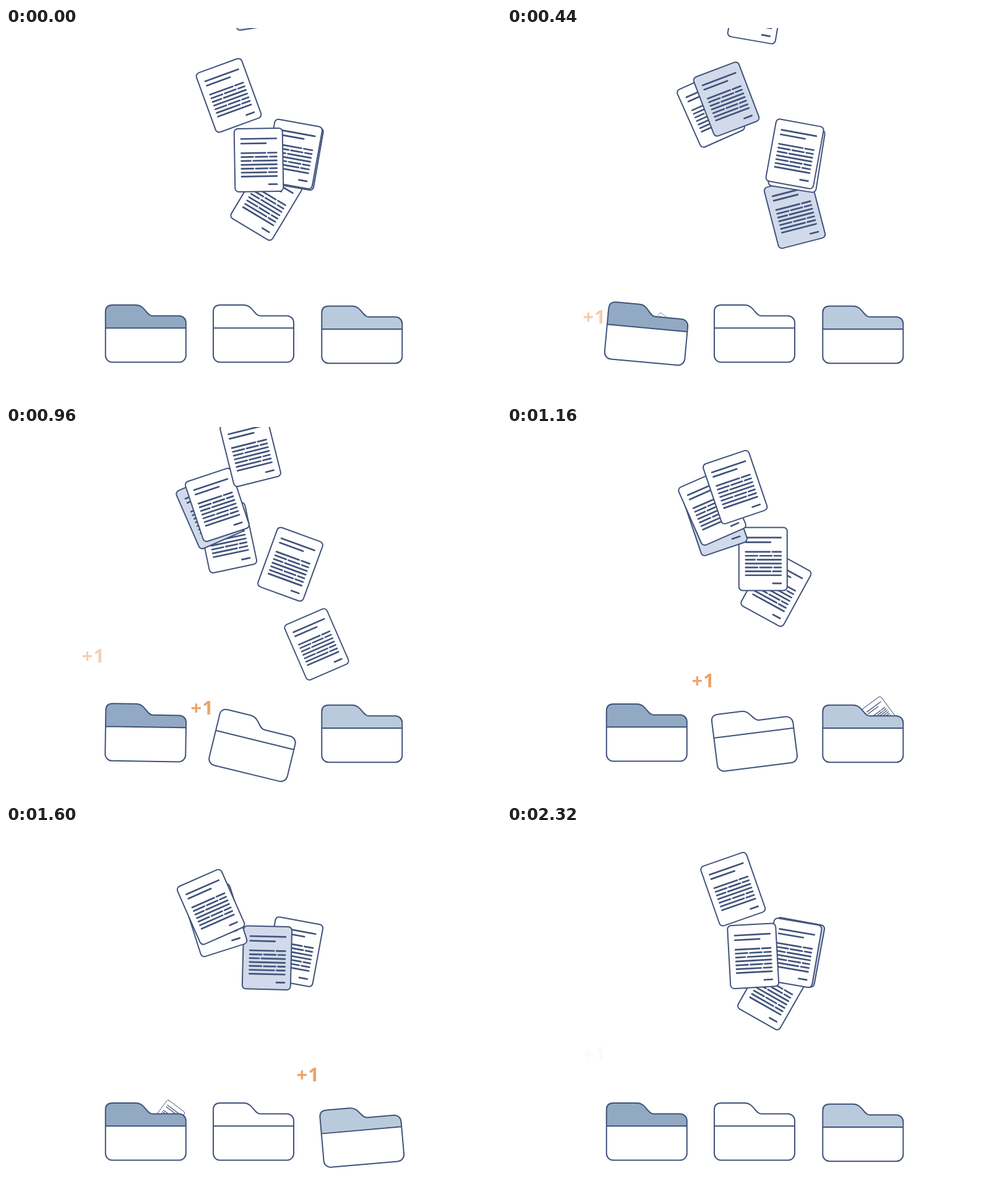
An HTML page with a canvas for the animation above (2.36 s loop, 800 by 600 pixels).

```html
<!DOCTYPE html>
<html lang="en">
<head>
<meta charset="utf-8">
<title>Sorting papers into folders</title>
<style>
  html, body { margin: 0; width: 100%; height: 100%; overflow: hidden; background: #fff; }
  canvas { display: block; }
</style>
</head>
<body>
<canvas id="stage" width="800" height="600"></canvas>
<script>
const ctx = document.getElementById('stage').getContext('2d');
const LOOP = 2360, STEP = 40;
const INK = '#41537b', PALE = '#d1daea', ORANGE = '#eea268';

// Key points: age, x, y, angle
const ROUTE = [
  [-90, 405, -95, -8], [40, 403, -30.5, -10], [135, 395, 38.5, -14],
  [400, 360, 109, -20], [548, 342, 125.5, -22.5], [900, 329, 134, -24],
  [1187, 337.5, 151, -18], [1360, 357.5, 179, -12], [1535, 408.5, 213.5, -1],
  [1760, 447, 211, 6], [2000, 465.5, 203.4, 10.5], [2300, 466.5, 204, 10.6]
];

// bends: key points between the route and the folder's mouth
const FOLDERS = [
  { x: 225.8, y: 494.3, plusX: 124, fill: '#92a9c3', hits: [440, 1695], swing: 1, spin: 37,
    bends: [[2495, 459.5, 222, 20], [2740, 426, 274, 30.3], [2895, 360.3, 362, 34.5]] },
  { x: 400, y: 494.3, plusX: 300, fill: '#fff', hits: [870], swing: 1, spin: -35,
    bends: [[2800, 465, 298.5, -14.5]] },
  { x: 575.3, y: 496, plusX: 471, fill: '#bacadd', hits: [1275], swing: 0.8, spin: -37,
    bends: [[2920, 502, 351.5, -23.5]] }
];

const PAPERS = [
  { start: 0, folder: 1, fill: PALE, twist: 0 },
  { start: 400, folder: 2, fill: '#fff', twist: 21 },
  { start: 825, folder: 0, fill: '#fff', twist: 0 },
  { start: 1960, folder: 0, fill: '#fff', twist: 0 }
];
const ENTER = -90, SHRINK = 2900, MOUTH = 3150, GONE = 3300;
for (const paper of PAPERS) {
  const { x, spin, bends } = FOLDERS[paper.folder];
  paper.path = [...ROUTE, ...bends, [MOUTH, x + 32, 474, spin], [GONE, x + 6, 486, spin]];
}

const clamp = v => Math.min(1, Math.max(0, v));
const ramp = (t, from, to) => clamp((t - from) / (to - from));
const ease = (t, from, to) => {
  const u = ramp(t, from, to);
  return u * u * (3 - 2 * u);
};

// Smooth interpolation without overshoot
function sample(keys, t, col) {
  const last = keys.length - 1;
  const slope = i => (keys[i + 1][col] - keys[i][col]) / (keys[i + 1][0] - keys[i][0]);
  const tangent = i => {
    if (i === 0) return slope(0);
    if (i === last) return slope(last - 1);
    const a = slope(i - 1), b = slope(i);
    return a * b <= 0 ? 0 : 2 * a * b / (a + b);
  };
  let i = 0;
  while (i < last - 1 && t >= keys[i + 1][0]) i++;
  const [from, to] = [keys[i], keys[i + 1]];
  const h = to[0] - from[0], u = ramp(t, from[0], to[0]), s = u * u * (3 - 2 * u);
  return from[col] * (1 - s) + to[col] * s
    + h * u * (1 - u) * ((1 - u) * tangent(i) - u * tangent(i + 1));
}

function place(x, y, angle, scale, draw) {
  ctx.save();
  ctx.translate(x, y);
  ctx.rotate(angle * Math.PI / 180);
  ctx.scale(scale, scale);
  ctx.strokeStyle = INK;
  ctx.lineJoin = ctx.lineCap = 'round';
  draw();
  ctx.restore();
}

function line(x1, x2, y) {
  ctx.moveTo(x1, y);
  ctx.lineTo(x2, y);
}

// Seven rows of text, broken by gaps at the given places
function writeText() {
  const left = -28, right = 29;
  const gaps = [[13], [-7, 16], [-11], [], [-7, 16], [14], []];
  line(left, right, -34.5);
  line(left, 12, -27);
  gaps.forEach((row, i) => {
    let x = left;
    for (const gap of [...row, right + 2]) {
      line(x, gap - 2, -11.5 + 6.3 * i);
      x = gap + 2;
    }
  });
  line(16, right, 39.5);
}

function drawPaper({ path, fill, twist, age }) {
  const [x, y, angle] = [1, 2, 3].map(col => sample(path, age, col));
  const extra = twist * (1 - ramp(age, 0, 700));
  const scale = 1 - 0.93 * ramp(age, SHRINK, GONE);
  place(x, y, angle + extra, scale, () => {
    ctx.beginPath();
    ctx.roundRect(-39, -51, 78, 102, 6);
    ctx.fillStyle = fill;
    ctx.fill();
    ctx.lineWidth = 2;
    ctx.stroke();
    ctx.beginPath();
    writeText();
    ctx.lineWidth = 2.7;
    ctx.stroke();
  });
}

// Papers can outlive one loop, so look for each one in the neighbouring loops too
function drawPapers(t) {
  const flying = [];
  for (const paper of PAPERS) {
    for (let k = -1; k <= 2; k++) {
      const age = t + k * LOOP - paper.start;
      if (age >= ENTER && age < GONE) flying.push({ ...paper, age });
    }
  }
  flying.sort((a, b) => b.age - a.age).forEach(drawPaper);
}

const sinceHit = (t, hits) =>
  Math.min(...hits.map(hit => (t - hit + 100 + LOOP) % LOOP - 100));

// Tips over to a peak, then rocks back and forth until it rests
function tilt(since) {
  const peak = 105, half = 205, d = since - peak;
  if (d < 0) return 14 * ease(since, -75, peak);
  return 14 * Math.cos(Math.PI * d / half) * (1 - clamp(d / 460)) ** 1.2;
}
const sink = since => 22 * ease(since, 0, 105) * (1 - ease(since, 105, 445));

function folderShape(w, h, r, tab) {
  ctx.beginPath();
  ctx.moveTo(0, h / 2);
  ctx.lineTo(0, r);
  ctx.quadraticCurveTo(0, 0, r, 0);
  ctx.lineTo(49, 0);
  ctx.bezierCurveTo(64, 0, 66, tab, 76, tab);
  ctx.arcTo(w, tab, w, h, r);
  ctx.arcTo(w, h, 0, h, r);
  ctx.arcTo(0, h, 0, 0, r);
  ctx.closePath();
}

function drawFolder({ x, y, fill, swing }, since) {
  const w = 130, h = 92.6, fold = 37.2;
  place(x, y + swing * sink(since), swing * tilt(since), 1, () => {
    ctx.translate(-w / 2, -h / 2);
    folderShape(w, h, 11, 17.6);
    ctx.fillStyle = '#fff';
    ctx.fill();
    ctx.save();
    ctx.clip();
    ctx.fillStyle = fill;
    ctx.fillRect(0, 0, w, fold);
    ctx.restore();
    line(0, w, fold);
    ctx.lineWidth = 2;
    ctx.stroke();
  });
}

function drawPlusOne({ plusX }, since) {
  ctx.save();
  ctx.globalAlpha = Math.min(ramp(since, -60, 50), 1 - ramp(since, 400, 640));
  ctx.fillStyle = ORANGE;
  ctx.font = '700 31px "Open Sans", sans-serif';
  ctx.letterSpacing = '1px';
  ctx.fillText('+1', plusX - 1.5, 483 - 104 * ease(since, -90, 580));
  ctx.restore();
}

function render(t) {
  ctx.fillStyle = '#fff';
  ctx.fillRect(0, 0, 800, 600);
  drawPapers(t);
  const times = FOLDERS.map(f => sinceHit(t, f.hits));
  FOLDERS.forEach((f, i) => drawFolder(f, times[i]));
  FOLDERS.forEach((f, i) => drawPlusOne(f, times[i]));
}

const begin = performance.now();
function tick() {
  const t = (performance.now() - begin) % LOOP;
  render(Math.floor(t / STEP) * STEP);
  requestAnimationFrame(tick);
}
tick();
</script>
</body>
</html>
```
